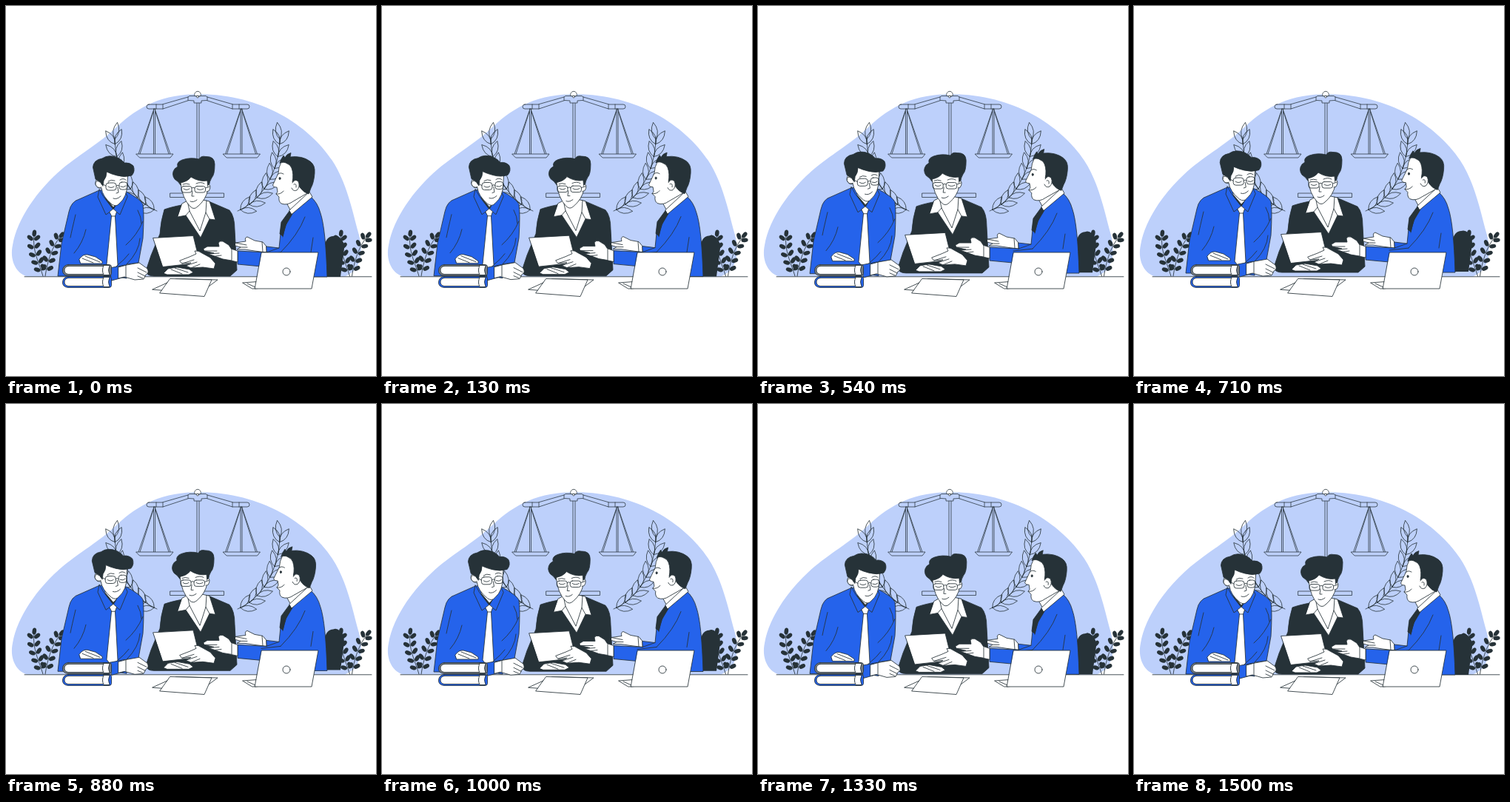
An HTML page for the animation above (1540 ms loop, 500x500 px).

```html
<!DOCTYPE html>
<html lang="en">
<head>
<meta charset="utf-8">
<title>Meeting at the table</title>
<style>
html, body { margin: 0; width: 100%; height: 100%; overflow: hidden; background: #fff; }
svg { display: block; width: 100vw; height: 100vh; }
.ink { stroke: #263238; stroke-width: .85; stroke-linejoin: round; stroke-linecap: round; }
.thin { stroke-width: .75; }
.l { fill: none; }
.w { fill: #fff; }
.b { fill: #2563eb; }
.d { fill: #263238; }
.s { fill: #bdd0fb; }
</style>
</head>
<body>
<svg viewBox="0 0 500 500">
  <path class="s" d="M28 365.500C12 360 5 342 9 323C15 288 42 249 76 220C104 197 126 186 150 163C180 135 212 119 262 119C345 120 408 160 441 209C460 238 468 276 476 306C484 333 480 357 458 365.500Z"/>

  <g class="ink thin l" id="scales">
    <path d="M258 131V254M261 131V254"/>
    <rect class="s" x="222" y="253" width="72.500" height="5.500"/>
    <path class="s" d="M193 133H211L246 123L248 121.500H270L272 123L307 133H326Q329 133 329 136T326 139H306L271 127.500L264 128V131H254V128L247 127.500L212 139H193Q190 139 190 136T193 133Z"/>
    <path d="M203 133V139M315 133V139M212 133V139M306 133V139M246 123V127.500M272 123V127.500"/>
    <path class="w" d="M255 121.500A4.400 4.400 0 1 1 263 121.500Z"/>
    <circle class="w" cx="259" cy="122.500" r="1.500"/>
  </g>
  <g class="ink thin l" id="laurels"></g>
  <g id="plants"></g>

  <g data-up="7">
    <path class="d" d="M430 366V325Q433 311 442 311Q447 309 451 313Q457 317 457 328L452 366Z"/>
  </g>
  <path class="ink l" d="M25 365.800H494"/>

  <!-- middle person -->
  <g class="ink" data-up="5">
    <path class="d" d="M237 269Q222 272 214 275Q209 291 208 308L196 337L189 358Q190 365 200 365H303L312 357L309 302Q309 284 302 276L274 264Z"/>
    <path class="w" d="M238 267L247 262H266L275 264L283 289L275 288L263 313L243 283L232 285Z"/>
    <path class="l" d="M245 263L248 277L262 304L270 279L271 263M248 277L243 283M270 279L275 288"/>
  </g>
  <g class="ink" data-up="6" data-side="-1">
    <path class="d" d="M236 242Q233 237 228 234Q223 227 228 220L232 217Q230 211 238 208Q249 204 261 207Q263 202 270 203.500Q282 203 282 214Q282 228 278 232Q275 236 274 245Z"/>
    <path class="w" d="M236 239Q246 237 250 231Q261 238 272 236L273 248Q270 262 259 271Q254 276 249 271Q238 260 236 239Z"/>
    <path class="w" d="M273 242Q277 240 275.500 247Q275 251 271 251"/>
    <g class="l">
      <rect x="237" y="243.500" width="14" height="8.500" rx="3"/>
      <rect x="255" y="243.500" width="14.500" height="8.500" rx="3"/>
      <path d="M251 246Q253 244 255 246M269.500 246L275 244M240 247Q244 250 248 247M258 247Q262 250 267 247M239 241Q243 239 248 241M257 240Q263 237 268 240M252 250L251 257H254M249 264Q253 266 258 262"/>
    </g>
  </g>
  <g class="ink" data-up="5">
    <path class="w" d="M213 361L219 355L231 353L248 356L253 360L247 363H218Z"/>
    <path class="l" d="M228 354L246 360M223 356L238 362"/>
    <path class="w" d="M199 313.500L253 310.500L262 347L212 352.500Z"/>
    <path class="w" d="M235 344L248 339L257 335L255 331Q260 330 265 334L276 340L283 348L281 355L266 353L250 354L243 351L250 347L238 348Z"/>
    <path class="l" d="M238 348L254 343M243 351L258 346M250 354L262 349"/>
  </g>

  <!-- right person -->
  <g class="ink" data-up="6">
    <path class="w" d="M310 320L324 318Q322 313 326 312L336 317L347 319L352 325V333L336 331L323 329H312L317 326L310 324Z"/>
    <path class="l" d="M310 320L325 323M317 326L326 326M346 319L347 332"/>
    <path class="b" d="M352 325L369 327L372 297L384 278L411 257Q421 265 425 280Q432 301 434 366H344L345 352L313 349V331L352 333Z"/>
    <path class="d" d="M383 277L372 292L370 308L374 311L378 296L387 281Z"/>
    <path class="w" d="M379 266L386 279L409 258L406 246Z"/>
    <path class="w" d="M383 276L410 251L414 258L386 281.500Z"/>
    <path class="l" d="M386 281Q378 291 374 312M369 327L352 333M404 285Q395 309 371 333M371 333L345 336M415 313L412 333"/>
    <path class="w" d="M304 328L313 331V346L304 344Z"/>
    <path class="w" d="M267 328L272 325L288 325L287 320Q289 317 293 318L301 323L305 329V344L293 342L282 338L273 335L281 334L268 331Z"/>
    <path class="l" d="M268 331L285 331M274 335L288 334M283 338L291 337"/>
  </g>
  <g class="ink" data-up="6" data-side="1" data-turn="1" data-pivot="390 260">
    <path class="w" d="M372 211Q368 218 368 226L360.500 242Q361 245 366 245L367 251L365 254L369 258Q368 264 372 267Q380 270 388 264L407 253L409 220L390 208Z"/>
    <path class="d" d="M370 212Q372 206 375 202L377 205Q379 200 385 198.500L384 204Q400 202 411 210Q418 215 417 226Q416 239 412 246L409 254Q402 252 397 245L393 236L387 238Q389 227 386 219Q384 214 380 213Q376 210 370 212Z"/>
    <path class="w" d="M387 239Q390 233 395 237Q398 244 393 249Q388 251 386 246"/>
    <ellipse class="d" cx="370" cy="233" rx="1" ry="1.600"/>
    <path class="l" d="M367 228Q370 224 375 227M365 254Q371 255 375 250M389 241Q393 239 392 245"/>
  </g>

  <!-- left person -->
  <g class="ink" data-up="4">
    <path class="b" d="M126 249L99 261Q88 264 85 278L75 321L70 365H144L163 368V349L179 347L185 314Q187 281 185 268Q182 261 161 250Z"/>
    <path class="w" d="M132 249L135 263L145 277L158 265L159 248Z"/>
    <path class="d" d="M135 260L145 272L157 260L153 271L145 278L138 270Z"/>
    <path class="b" d="M126 248L124 258L135 282L145 275L132 258Z"/>
    <path class="b" d="M160 249L145 275L154 282L164 258Z"/>
    <path class="w" d="M140 278L145 274L149.500 278L147.500 284L151 350L143 358L136 349L142.500 284Z"/>
    <path class="l" d="M142.500 284H147.500M108 302Q104 320 92 334M185 291Q177 310 162 323M181 314Q180 332 163 349M151 350Q160 343 166 335M178 276Q183 285 183 294M94 282Q89 303 87 313"/>
    <path class="w" d="M99 342Q104 335 110 336L121 339L130 345V348H101Z"/>
    <path class="l" d="M107 338L127 346M103 341L118 347"/>
  </g>
  <g class="ink" data-up="5">
    <path class="b" d="M140 354L161 350V366L143 371Z"/>
    <path class="w" d="M152 353L163 350L180 347L191 355Q194 361 189 363L186 369L174 370L160 366L152 368Z"/>
    <path class="l" d="M162 350V366M178 354L190 360M178 360L188 365M178 365L185 368"/>
  </g>
  <g class="ink" data-up="7" data-side="-.5" data-turn="-1" data-pivot="145 265">
    <path class="w" d="M125 233Q120 235 121 241Q123 247 129 246Q130 257 143 268Q149 272 153 267Q164 258 164 239L165 224L143 216L130 222Z"/>
    <path class="d" d="M127 238L121 234L117.500 218Q118 208 130 206Q139 200 151 205Q157 208 160 212Q167 211 172 216Q175 223 170 229Q160 232 150 229Q142 227 136 224Q136 231 132 236L131 243Z"/>
    <path class="w" d="M127 238Q121 234 121 241Q123 247 129 245"/>
    <g class="l">
      <rect x="135" y="239" width="14" height="10" rx="3.500"/>
      <rect x="153" y="238" width="11" height="10" rx="3.500"/>
      <path d="M149 243Q151 241 153 243M129 240L135 243M138 244Q142 247 146 244M155 244Q159 246 162 243M138 237Q142 234 147 236M154 235Q158 232 162 235M151 245L152 252L149 253M145 260Q150 262 155 257"/>
    </g>
  </g>

  <g class="ink" id="books"></g>

  <g class="ink w" id="desk">
    <path d="M198 383L230 368.500L286 370L262 388Z"/>
    <path d="M222 368.500L278 370L268 392.500L208 388Z"/>
    <path d="M320 374L340 372.500L345 381L337 382H333Z"/>
    <path class="l" d="M326 375L337 380"/>
    <path d="M345.500 333H422L413 382H336.500Z"/>
    <circle cx="379" cy="359" r="5"/>
  </g>
</svg>
<script>
const LOOP = 1540, STEPS = 37;
const $ = id => document.getElementById(id);
const put = (id, html) => $(id).insertAdjacentHTML('beforeend', html);
const path = (d, cls = '') => `<path class="${cls}" d="${d}"/>`;

// point and heading on a cubic curve
function along([a, b, c, d], t) {
  const u = 1 - t;
  const at = i => u * u * u * a[i] + 3 * u * u * t * b[i] + 3 * u * t * t * c[i] + t * t * t * d[i];
  const slope = i => u * u * (b[i] - a[i]) + 2 * u * t * (c[i] - b[i]) + t * t * (d[i] - c[i]);
  return { x: at(0), y: at(1), dir: Math.atan2(slope(1), slope(0)) * 180 / Math.PI };
}
const curve = ([a, b, c, d]) => `M${a}C${b} ${c} ${d}`;

function pan(x) {
  put('scales', path(`M${x} 139L${x - 21} 200M${x + 1} 139L${x + 22} 200M${x - 1} 143L${x - 19} 200` +
    `M${x + 2} 143L${x + 20} 200M${x - .5} 139V200M${x + 1.5} 139V200`) +
    path(`M${x - 24} 200H${x + 26}L${x + 22} 205H${x - 19}Z`, 's'));
}
pan(200);
pan(317.5);

const wreath = [[313, 277], [345, 264], [369, 225], [370, 180]];
const leaf = ({ x, y }, turn, len) =>
  `<path d="M0 0Q${len * .45} -8 ${len} 0Q${len * .45} 8 0 0Z" transform="translate(${x} ${y}) rotate(${turn})"/>`;
function laurel() {
  let out = path(curve(wreath));
  for (let i = 0; i < 8; i++) {
    const p = along(wreath, .04 + i * .13);
    out += leaf(p, p.dir - 28, 22) + leaf(p, p.dir + 31, 22);
  }
  const tip = along(wreath, 1);
  return out + leaf(tip, tip.dir - 10, 23);
}
put('laurels', `<g>${laurel()}</g><g transform="translate(517) scale(-1 1)">${laurel()}</g>`);

function sprig(stem) {
  let out = path(curve(stem), 'ink l');
  const blob = (p, side) => `<ellipse class="d" cx="${side ? 6 : 2}" rx="4.600" ry="2.800" ` +
    `transform="translate(${p.x} ${p.y}) rotate(${p.dir + side * 52})"/>`;
  for (let i = 0; i < 5; i++) {
    const p = along(stem, .13 + i * .185);
    out += blob(p, -1) + blob(p, 1);
  }
  return out + blob(along(stem, 1), 0);
}
const plant = x => `<g transform="translate(${x})">` +
  sprig([[50, 365], [45, 348], [35, 330], [38, 309]]) +
  sprig([[53, 365], [56, 345], [62, 325], [74, 311]]) + '</g>';
put('plants', plant(0) + plant(414.5));

function book(y, cover) {
  put('books', `<path fill="${cover}" d="M84 ${y}H139Q142.500 ${y} 142.500 ${y + 3}V${y + 12}Q142.500 ${y + 15} 139 ${y + 15}H84Q76 ${y + 14} 76.500 ${y + 7.500}T84 ${y}Z"/>` +
    path(`M84 ${y + 2}H132Q129 ${y + 7.500} 132 ${y + 13}H84Q79 ${y + 12} 79 ${y + 7.500}T84 ${y + 2}Z`, 'w') +
    path(`M132 ${y + 1}H140Q137 ${y + 7.500} 140 ${y + 14}H132Q129 ${y + 7.500} 132 ${y + 1}Z`, 'w'));
}
book(365.5, '#2563eb');
book(349.5, '#777d84');

const parts = [...document.querySelectorAll('[data-up]')].map(el => {
  const { up, side = 0, turn = 0, pivot = '0 0' } = el.dataset;
  return { el, up: +up, side: +side, turn: +turn, pivot };
});

const start = performance.now();
function draw(now) {
  const step = Math.floor(Math.max(0, now - start) % LOOP / LOOP * STEPS + .05) % STEPS;
  const k = (1 - Math.cos(2 * Math.PI * step / (STEPS - 1))) / 2;
  for (const p of parts)
    p.el.setAttribute('transform', `translate(${p.side * k} ${-p.up * k}) rotate(${p.turn * k} ${p.pivot})`);
  requestAnimationFrame(draw);
}
draw(start);
</script>
</body>
</html>
```
